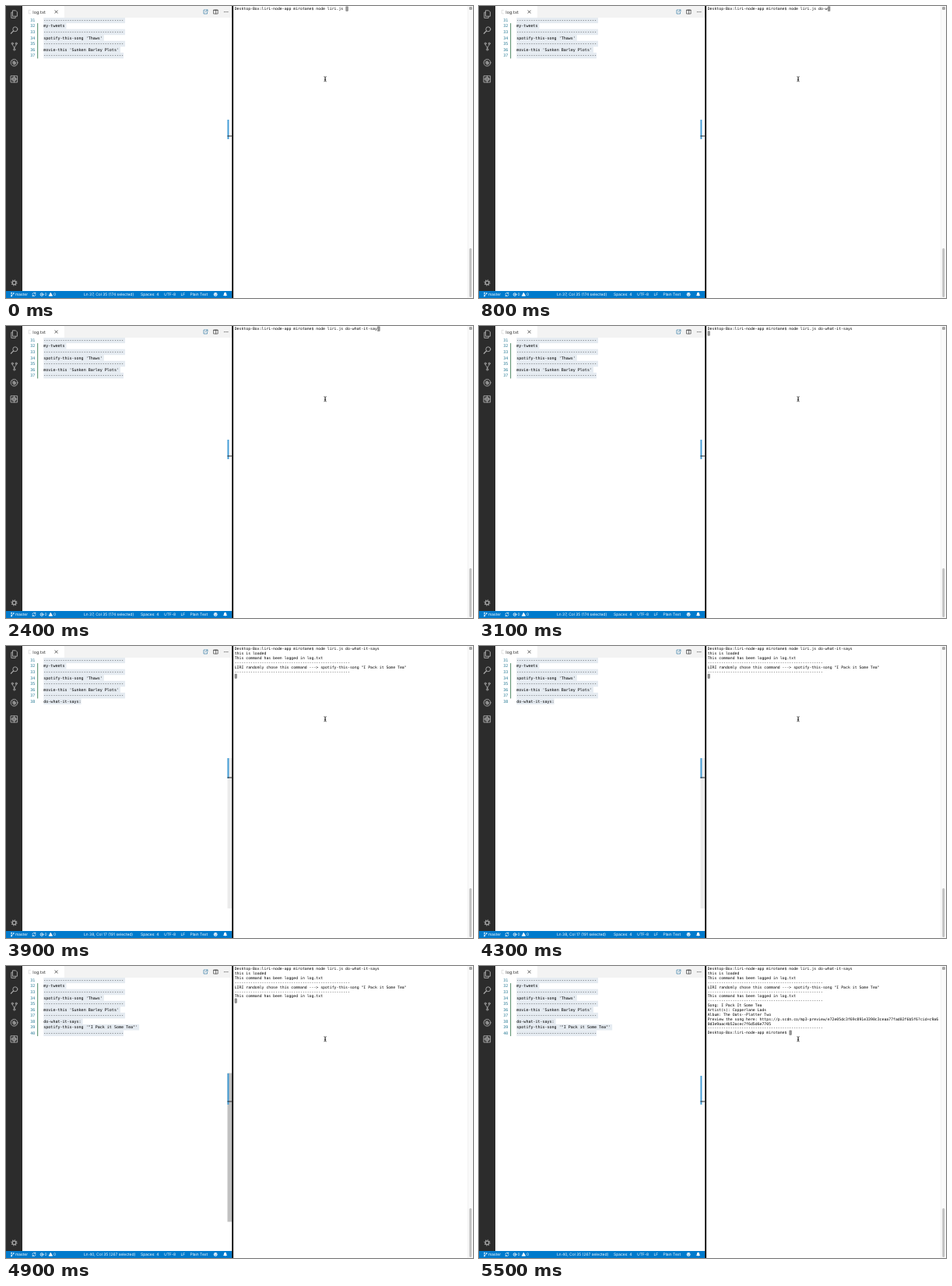
Write an HTML page that moves like this. It is 600 px wide and 375 px high and loops after 5.7 s.

```html
<!DOCTYPE html>
<html lang="en">
<head>
<meta charset="utf-8">
<title>Editor and terminal</title>
<style>
  html, body { margin: 0; width: 100%; height: 100%; overflow: hidden; background: #fff; }
  svg { display: block; width: 100vw; height: 100vh; text-rendering: geometricPrecision; }
  .code, .term { font-family: "DejaVu Sans Mono", monospace; }
  .code { font-size: 5.02px; }
  .term { font-size: 4.842px; }
  .ui { font: 4.95px Inter, sans-serif; }
  .line { fill: none; stroke-linecap: round; stroke-linejoin: round; }
</style>
</head>
<body>
<svg viewBox="0 0 600 375">
  <rect width="600" height="375" fill="#fff"/>
  <g id="editor" class="code"></g>
  <g id="ruler"></g>

  <!-- Tab bar -->
  <rect x="21" width="269.5" height="15" fill="#f3f3f3"/>
  <rect x="21" width="54" height="15" fill="#fff"/>
  <path class="line" d="M31.5 5.3H29.2V9.8H31.5" stroke="#d0d0d0" stroke-width=".6"/>
  <text class="ui" x="34.3" y="9.6" style="font-size:5.6px" fill="#333">log.txt</text>
  <path class="line" d="M62.9 5.9l3.2 3.2m0-3.2l-3.2 3.2" stroke="#333" stroke-width=".8"/>
  <g class="line" stroke-width=".7">
    <path d="M256 5H254V10H258.5V8M256 7.8l2.8-2.8M257 4.9h2V7" stroke="#3c7fa8"/>
    <path d="M267 5h5.2v5H267zM269.6 5v5M267 5.5h5" stroke="#444"/>
  </g>
  <g fill="#444">
    <circle cx="280.7" cy="7.6" r=".6"/><circle cx="282.8" cy="7.6" r=".6"/><circle cx="284.9" cy="7.6" r=".6"/>
  </g>

  <!-- Activity bar -->
  <rect width="21" height="367" fill="#2c2c2c"/>
  <g class="line" stroke="#a2a2a2" stroke-width="1">
    <path d="M8.8 5.8h3.6l2 2v5.4H8.8zM8.6 8.2H6.8v7.2h5.4v-2"/>
    <circle cx="11.8" cy="29.8" r="3"/><path d="M9.6 32L6.4 35.3" stroke-width="1.3"/>
    <circle cx="8.2" cy="48.2" r="1.1"/><circle cx="13.2" cy="48.2" r="1.1"/><circle cx="10.7" cy="56" r="1.1"/>
    <path d="M8.2 49.4c0 2 2.5 2 2.5 5.4M13.2 49.4c0 2-2.5 2-2.5 5.4"/>
    <circle cx="10.5" cy="72.8" r="4.4"/><ellipse cx="10.5" cy="73" rx="1.5" ry="2.2"/>
    <path d="M7.5 69.8l6 6M8 73h5M10.5 70.8v4.4" stroke-width=".7"/>
    <path d="M6.4 89.8h8.2v8.2H6.4zM10.5 90v8M6.6 93.9h8"/>
    <rect x="8.6" y="92" width="3.8" height="3.8" fill="#777"/>
    <circle cx="10.5" cy="355.4" r="2.3" stroke-width="1.4"/>
    <circle cx="10.5" cy="355.4" r="3.5" stroke-width="1.2" stroke-dasharray="1.1 1.65" stroke-linecap="butt"/>
  </g>

  <!-- Status bar -->
  <rect y="366" width="290.5" height="9" fill="#007acc"/>
  <g class="line" stroke="#fff" stroke-width=".7">
    <path d="M7 369v3.2M9.6 369.6c0 1.6-2.6 1-2.6 2.6"/>
    <circle cx="7" cy="368.5" r=".5"/><circle cx="9.6" cy="369" r=".5"/><circle cx="7" cy="372.6" r=".5"/>
    <path d="M34 370a2 2 0 0 1 3.6-1M38 370.8a2 2 0 0 1-3.6 1M37.8 368v1.2h-1.2M34.2 372.8v-1.2h1.2"/>
    <circle cx="46" cy="370.5" r="1.9"/><path d="M45.3 369.8l1.4 1.4m0-1.4l-1.4 1.4"/>
    <path d="M57.5 368.4l2.1 3.8h-4.2z" fill="#fff"/>
  </g>
  <circle cx="269.2" cy="370.4" r="2.4" fill="#fff"/>
  <path class="line" d="M268.2 369.6v.1M270.2 369.6v.1M267.9 371q1.3 1.4 2.6 0" stroke="#007acc" stroke-width=".6"/>
  <path d="M279 372q1-.7 1-2.2c0-2.6 3.2-2.6 3.2 0q0 1.5 1 2.2zM280.9 372.3h1.4l-.7.7z" fill="#fff"/>
  <g class="ui" fill="#fff">
    <text x="12" y="372.3">master</text>
    <text x="49.5" y="372.3">0</text>
    <text x="61" y="372.3">0</text>
    <text id="position" x="100" y="372.3"></text>
    <text x="173" y="372.3">Spaces: 4</text>
    <text x="203" y="372.3">UTF-8</text>
    <text x="224.5" y="372.3">LF</text>
    <text x="236.5" y="372.3">Plain Text</text>
  </g>

  <!-- Terminal -->
  <rect x="290.3" width="1.8" height="375" fill="#000"/>
  <rect x="593.5" width="6.5" height="375" fill="#fafafa"/>
  <path d="M593.5 0V375" stroke="#e9e9e9" stroke-width=".6"/>
  <rect x="595.3" y="311" width="3" height="63" rx="1.5" fill="#c1c1c1"/>
  <rect x="595" y="1" width="4" height="4" rx="1.2" fill="#a8a8a8"/>
  <g id="terminal" class="term"></g>
  <rect id="cursor" width="2.5" height="5.4" fill="#999" stroke="#666" stroke-width=".5"/>
  <path class="line" d="M408.8 90.7q1.3 0 1.3.8v4.6q0 .8-1.3.8M411.4 90.7q-1.3 0-1.3.8v4.6q0 .8 1.3.8M409.4 94.6h1.4" stroke="#222" stroke-width=".7"/>
</svg>
<script>
const LOOP = 5700;
const $ = id => document.getElementById(id);
const dashes = n => '-'.repeat(n);

function add(parent, tag, attrs, text = '') {
  const node = document.createElementNS('http://www.w3.org/2000/svg', tag);
  for (const key in attrs) node.setAttribute(key, attrs[key]);
  node.textContent = text;
  parent.append(node);
  return node;
}

// Latest entry of a [time, ...values] table at time t
const at = (table, t) => table.findLast(row => row[0] <= t);

// Editor
const CODE = { x: 48.3, char: 3.022, row: 7.55, base: 27.4, first: 32 };
const FIRST_SAVE = 3800, SECOND_SAVE = 4600;
const fileLines = [
  [0, dashes(34)], [0, 'my-tweets'], [0, dashes(34)],
  [0, "spotify-this-song 'Thaws'"], [0, dashes(34)],
  [0, "movie-this 'Sunken Barley Plots'"], [0, dashes(34)],
  [FIRST_SAVE, 'do-what-it-says:'],
  [SECOND_SAVE, `spotify-this-song '"I Pack it Some Tea"'`],
  [SECOND_SAVE, dashes(34)]
];
// time, last line, column, selected characters, slider top, slider height, mark top, mark bottom, caret mark
const saves = [
  [0, 37, 35, 174, 146, 192, 146, 171, 167],
  [FIRST_SAVE, 38, 17, 191, 144, 193, 144, 170, 169],
  [SECOND_SAVE, 40, 35, 267, 137.5, 191, 138, 178, 174],
  [5400, 40, 35, 267, 137.5, 191, 141, 178, 174]
];
const sliderOpacity = [
  [0, 0], [FIRST_SAVE, .3], [4000, .5], [4300, .3], [SECOND_SAVE, 1],
  [5000, .75], [5100, .5], [5200, .3], [5300, .15], [5400, 0]
];

const editorRows = fileLines.map(([from, text], i) => {
  const number = 31 + i;
  const y = CODE.base + (number - CODE.first) * CODE.row;
  const group = add($('editor'), 'g', {});
  const selection = add(group, 'rect', { x: CODE.x, y: y - 5.3, height: CODE.row, fill: '#e5ebf1' });
  add(group, 'text', { x: 37.3, y, 'text-anchor': 'end', fill: '#237893' }, number);
  add(group, 'text', { x: CODE.x, y, fill: '#000' }, text);
  return { from, number, group, selection, width: text.length * CODE.char };
});
const gutter = add($('editor'), 'rect', { x: 40, y: 22.1, width: 1.2, fill: '#6b9c7c' });
const slider = add($('ruler'), 'rect', { x: 284.5, width: 5.8, fill: '#c1c1c1' });
const mark = add($('ruler'), 'rect', { x: 284.5, width: 1.9, fill: '#3f9bd6' });
const caretMark = add($('ruler'), 'rect', { x: 284.5, width: 5.8, height: 1, fill: '#222' });

// Terminal
const TERM = { x: 293.7, char: 2.915, row: 5.86, base: 5.3 };
const prompt = 'Desktop-Box:liri-node-app mirotane$ ';
const command = prompt + 'node liri.js do-what-it-says';
const logged = 'This command has been logged in log.txt';
const output = [
  [0, command],
  [3600, 'this is loaded'],
  [3700, logged],
  [3700, dashes(51)],
  [3700, 'LIRI randomly chose this command ---> spotify-this-song "I Pack it Some Tea"'],
  [3700, dashes(51)],
  [4400, logged],
  [5000, dashes(51)],
  [5000, 'Song: I Pack It Some Tea'],
  [5000, 'Artist(s): Copperlane Lads'],
  [5000, 'Album: The Oats--Platter Two'],
  [5000, 'Preview the song here: https://p.scdn.co/mp3-preview/e72e05dc3f69c891e3390c3ceaa77fad02f6b5f6?cid=c9a6'],
  [5000, '0d3e9aac4b52acec7f6d5d6e7705'],
  [5000, dashes(51)],
  [5200, prompt]
];
const typedFrom = prompt.length + 'node liri.js '.length;
const keyTimes = [200, 300, 500, 700, 900, 1000, 1200, 1300, 1500, 1600, 2100, 2200, 2300, 2400, 2500];
const cursorRows = [[2800, 1], [3600, 2], [3700, 6], [4400, 7], [5000, 14]];

const termRows = output.map(([from, text], i) => ({
  from,
  node: add($('terminal'), 'text', { x: TERM.x, y: TERM.base + i * TERM.row }, text)
}));

function set(node, attrs) {
  for (const key in attrs) node.setAttribute(key, attrs[key]);
}
const show = (node, visible) => { node.style.display = visible ? '' : 'none'; };

function drawEditor(t) {
  const [, last, column, selected, top, height, markTop, markEnd, caret] = at(saves, t);
  for (const row of editorRows) {
    show(row.group, t >= row.from);
    set(row.selection, { width: row.width + (row.number < last ? 2 : 0) });
  }
  set(gutter, { height: (last === 40 ? 9 : 6) * CODE.row });
  set(slider, { y: top, height, opacity: at(sliderOpacity, t)[1] });
  set(mark, { y: markTop, height: markEnd - markTop });
  set(caretMark, { y: caret - .5 });
  $('position').textContent = `Ln ${last}, Col ${column} (${selected} selected)`;
}

function drawTerminal(t) {
  const typed = typedFrom + keyTimes.filter(time => time <= t).length;
  for (const row of termRows) show(row.node, t >= row.from);
  termRows[0].node.textContent = command.slice(0, typed);
  const moved = at(cursorRows, t);
  const row = moved ? moved[1] : 0;
  const column = !moved ? typed : t >= 5200 ? prompt.length : 0;
  set($('cursor'), { x: TERM.x + column * TERM.char + .3, y: .9 + row * TERM.row });
}

const start = performance.now();
let shownStep = -1;
function tick() {
  const t = (performance.now() - start) % LOOP;
  const step = Math.floor(t / 100);
  if (step !== shownStep) {
    drawEditor(t);
    drawTerminal(t);
    shownStep = step;
  }
  requestAnimationFrame(tick);
}
tick();
</script>
</body>
</html>
```
